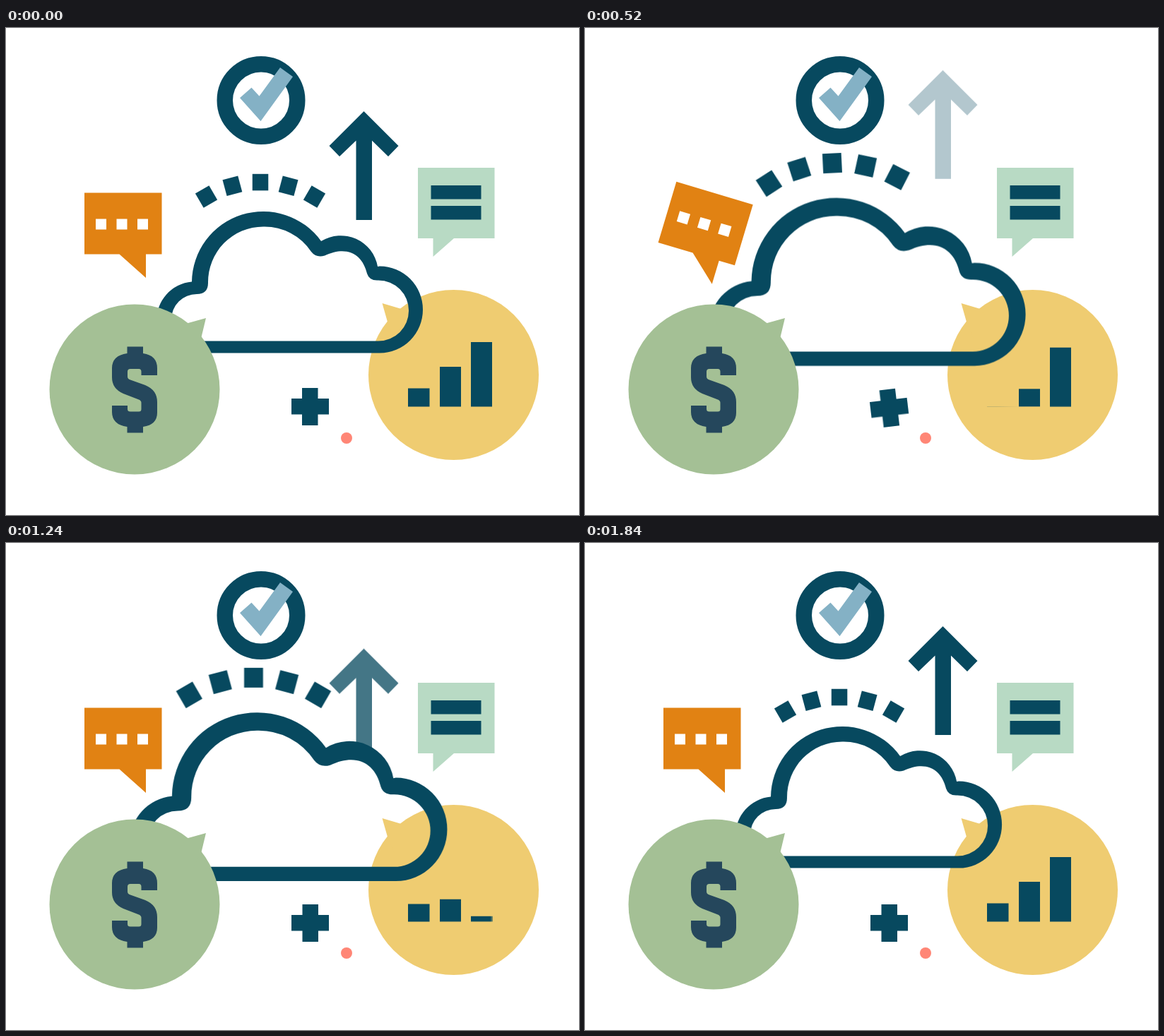
Animation of 811 by 690 pixels, one loop 1920 ms. Source, as an HTML page without scripts:

```html
<!DOCTYPE html>
<html lang="en">
<head>
<meta charset="utf-8">
<title>Cloud finance</title>
<style>
  :root {
    --navy: #07495f;
    --in-out: cubic-bezier(.65, 0, .35, 1);
    --out: cubic-bezier(.33, 1, .68, 1);
  }
  html, body { margin: 0; width: 100%; height: 100%; overflow: hidden; background: #fff; }
  svg { display: block; width: 100vw; height: 100vh; }
  .navy { fill: var(--navy); }

  .cloud, .dashes, .arrow, .rise, .bar, .plus, .chat {
    animation: 1920ms linear infinite;
  }

  .cloud { transform-origin: 410px 363.5px; animation-name: swell; animation-timing-function: var(--in-out); }
  @keyframes swell {
    0% { transform: scale(1); animation-timing-function: ease; }
    39.58%, 56.25% { transform: scale(1.2); }
    97.92%, 100% { transform: scale(1); }
  }

  .dashes { transform-origin: 360px 231px; animation-name: tilt; animation-timing-function: ease-in-out; }
  @keyframes tilt {
    0%, 37.5% { transform: rotate(0deg); }
    18.75% { transform: rotate(-4.8deg); }
    54.17% { transform: rotate(-.8deg); }
    62%, 100% { transform: rotate(0deg); }
  }

  .rise { animation-name: rise; animation-timing-function: var(--out); }
  @keyframes rise {
    0% { transform: translateY(0); animation-timing-function: cubic-bezier(.55, 0, .45, 1); }
    45.83% { transform: translateY(-84px); animation-timing-function: step-start; }
    54.17% { transform: translateY(84px); }
    91.67%, 100% { transform: translateY(0); }
  }
  .arrow { animation-name: fade; }
  @keyframes fade {
    0% { opacity: 1; animation-timing-function: cubic-bezier(.55, 0, .45, 1); }
    45.83%, 54.17% { opacity: 0; }
    68%, 100% { opacity: 1; }
  }

  .bar { transform-origin: 0 536.5px; animation-timing-function: var(--in-out); }
  .b1 { animation-name: bar1; }
  .b2 { animation-name: bar2; }
  .b3 { animation-name: bar3; }
  @keyframes bar1 {
    0%, 70.26%, 100% { transform: scaleY(1); }
    29.69%, 40.57% { transform: scaleY(0); }
  }
  @keyframes bar2 {
    0%, 11.72%, 78.6%, 100% { transform: scaleY(1); }
    41.41%, 49.4% { transform: scaleY(0); }
  }
  @keyframes bar3 {
    0%, 19.17%, 86.35%, 100% { transform: scaleY(1); }
    48.85%, 56.67% { transform: scaleY(0); }
  }

  /* the pivot sits slightly off the centre of the plus */
  .plus { transform-origin: 429.5px 537.5px; animation-name: turn; animation-timing-function: ease; }
  @keyframes turn {
    0% { transform: rotate(0deg); }
    40.63%, 100% { transform: rotate(90deg); }
  }

  .chat {
    transform-origin: 166px 293.5px;
    animation-name: shake, puff;
    animation-timing-function: ease-in-out;
  }
  @keyframes shake {
    0%, 56%, 100% { rotate: 0deg; }
    9.48%, 47.4% { rotate: -17deg; }
    28.54% { rotate: 17deg; }
  }
  @keyframes puff {
    0%, 55%, 100% { scale: 1; }
    33% { scale: 1.035; }
  }
</style>
</head>
<body>
<svg viewBox="0 0 811 690" xmlns="http://www.w3.org/2000/svg">
  <!-- check badge -->
  <circle cx="361" cy="102.5" r="51.25" fill="none" stroke="#07495f" stroke-width="22.5"/>
  <path fill="#84b1c5" d="M331 99L347.5 84.5 358.5 96.5 388 56 406 69 360.5 132Z"/>

  <!-- notes bubble -->
  <path fill="#b8dac4" d="M583 198H691.5V298H634L604.5 324V298H583Z"/>
  <path class="navy" d="M601.5 223H672.5V242.5H601.5ZM601.5 252H672.5V271.5H601.5Z"/>

  <!-- chat bubble -->
  <g class="chat">
    <path fill="#e18213" d="M111 233.5H220.5V320.5H198V354L160.5 320.5H111Z"/>
    <path fill="#fff" d="M127 270.5h15v15h-15zM156.5 270.5h15v15h-15zM186 270.5h15v15h-15z"/>
  </g>

  <!-- chart bubble -->
  <g fill="#efcc71">
    <circle cx="633.5" cy="491.5" r="120.5"/>
    <path d="M532.5 390L559.5 398 575 420 550 440 540 416.5Z"/>
  </g>
  <g class="navy">
    <rect class="bar b1" x="569" y="510.5" width="30.5" height="26"/>
    <rect class="bar b2" x="614" y="480" width="30" height="56.5"/>
    <rect class="bar b3" x="658" y="445" width="30" height="91.5"/>
  </g>

  <g class="arrow">
    <path class="rise navy" d="M506.5 118L555.5 167 541 182 518 159.5V272H495.5V159.5L472 182 457.5 167Z"/>
  </g>

  <g class="cloud navy">
    <path fill-rule="evenodd" d="
      M268 460.5H529A61 61.5 0 0 0 529 337.5L526 338A53 53 0 0 0 446 302
      A101 101 0 0 0 263 359.5A55 55 0 0 0 213 415A55 45.5 0 0 0 268 460.5Z
      M268 443.5A34 30 0 0 1 234 413A36 36 0 0 1 270 377Q286 377 286 361
      A78 78.5 0 0 1 364 281.5A79 79 0 0 1 432 317Q439 326 451 322.5
      C484 307 505 322 511 348Q514 357.5 525 357.5H527A43 43 0 0 1 527 443.5Z"/>
    <g class="dashes">
      <rect id="dash" x="348.75" y="206.8" width="22.5" height="23.5"/>
      <use href="#dash" transform="rotate(-30 360 371.5)"/>
      <use href="#dash" transform="rotate(-15 360 371.5)"/>
      <use href="#dash" transform="rotate(15 360 371.5)"/>
      <use href="#dash" transform="rotate(30 360 371.5)"/>
    </g>
  </g>

  <!-- money bubble -->
  <g fill="#a4c095">
    <circle cx="182" cy="512" r="120.5"/>
    <path d="M283 411L256 418.5 240 440 265 460 276.5 438Z"/>
  </g>
  <path fill="#25475c" d="M171.5 451.5H194V461Q214 464 214 482V492H191.5V487Q191.5 483 188 483H176Q172 483 172 487
    V494Q172 497 176 498.5L197 506Q214 513 214 530V545Q214 562 194 565V573.5H171.5V565Q150 562 150 544V535H172
    V540Q172 543.5 176 543.5H188Q191.5 543.5 191.5 540V531Q191.5 528 188 526.5L166 518Q150 511 150 495V482Q150 464 171.5 461Z"/>

  <path class="plus navy" d="M419 510H441.5V525H457V547.5H441.5V563H419V547.5H404V525H419Z"/>
  <circle cx="482" cy="581" r="8" fill="#ff8676"/>
</svg>
</body>
</html>
```
